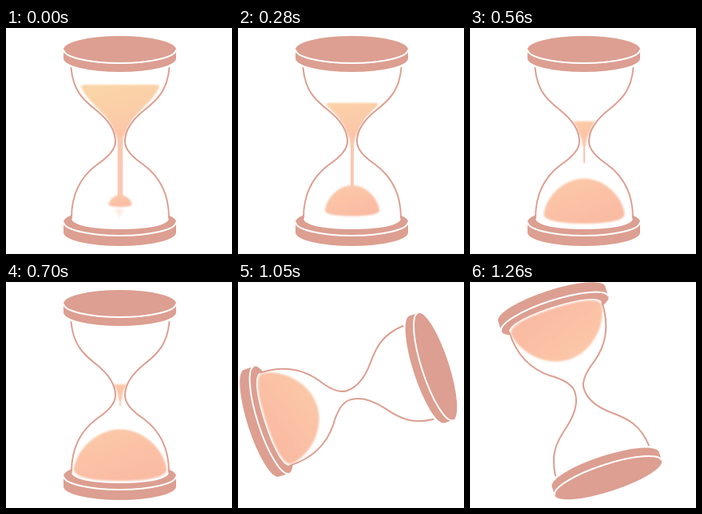
An HTML page that plays this animation: 283x283 px, repeating every 1330 ms.

```html
<!DOCTYPE html>
<html lang="en">
<head>
<meta charset="utf-8">
<title>Hourglass</title>
<style>
  html, body { margin: 0; width: 100%; height: 100%; overflow: hidden; background: #fff; }
  svg { display: block; width: 100vw; height: 100vh; }
  .wood { fill: #dc9f91; }
  .seam { fill: none; stroke: #fff; stroke-width: 2; }
  .glass { fill: none; stroke: #dc9f91; stroke-width: 2; stroke-linecap: round; }
</style>
</head>
<body>
<svg viewBox="0 0 283 283">
  <defs>
    <linearGradient id="gold" x1="0" y1="0" x2=".35" y2="1">
      <stop offset="0" stop-color="#fad7a8"/>
      <stop offset=".5" stop-color="#fbcfa8"/>
      <stop offset="1" stop-color="#fbc3a8"/>
    </linearGradient>
    <linearGradient id="peach" x1="0" y1="0" x2=".6" y2="1">
      <stop offset="0" stop-color="#fbcaa9"/>
      <stop offset="1" stop-color="#fabba3"/>
    </linearGradient>
    <filter id="soft" x="-20%" y="-20%" width="140%" height="140%">
      <feGaussianBlur stdDeviation=".9"/>
    </filter>
    <clipPath id="level"><rect id="cut"/></clipPath>
    <path id="side" d="M81.5 50C84 77 95 89 113 103C128 115 137 129 137 142C137 152 129 161 114 171C95 185 82 206 82 238"/>
  </defs>
  <g id="timer">
    <path class="wood" d="M72 243A70.5 17 0 0 1 213 243V256A70.5 17 0 0 1 72 256Z"/>
    <path class="seam" d="M72 243A70.5 17 0 0 0 213 243"/>
    <path fill="#fff" d="M82 238C82 206 95 185 114 171L143 160L172 171C191 185 204 206 204 238C204 247 178 252 143 252S82 247 82 238Z"/>
    <g id="upper" filter="url(#soft)">
      <g clip-path="url(#level)">
        <path fill="url(#gold)" d="M92 68C96 83 107 92 118 104C128 113 133 122 136 131C139 136 140.5 140 141 148H145C145.500 140 147 136 150 131C153 122 158 113 168 104C179 92 190 83 194 68Z"/>
      </g>
    </g>
    <path id="stream" stroke="#fac8b0" fill="none"/>
    <path id="dome" fill="url(#peach)" filter="url(#soft)"/>
    <path id="splash" fill="#fbd9c8" opacity=".5" filter="url(#soft)" d="M136 226L142 238L147 227Z"/>
    <use href="#side" class="glass"/>
    <use href="#side" class="glass" transform="matrix(-1 0 0 1 286 0)"/>
    <path class="wood" d="M72 27A70.5 17 0 0 1 213 27V38A70.5 17 0 0 1 72 38Z"/>
    <path class="seam" d="M72 27A70.5 17 0 0 0 213 27"/>
  </g>
</svg>
<script>
  const LOOP = 1330, STEP = 70, MID = 143;
  const el = id => document.getElementById(id);
  const set = (id, attrs) => {
    for (const k in attrs) el(id).setAttribute(k, attrs[k]);
  };

  const times = [0, 280, 420, 700, 840];
  const keys = {
    half: [14.5, 34, 43, 58, 59.5],
    top: [209, 197, 192.5, 184.5, 183],
    edge: [221, 228, 231, 234, 235],
    base: [224, 235.5, 241, 249, 250],
    surface: [50, 34, 25, 9, 1],
    tip: [212, 198, 183, 155, 140],
    width: [6.5, 4, 3, 1.6, 1]
  };

  function at(name, t) {
    const v = keys[name];
    if (t >= 840) return v[4];
    const i = times.findIndex(x => x > t) - 1;
    return v[i] + (v[i + 1] - v[i]) * (t - times[i]) / (times[i + 1] - times[i]);
  }

  function domePath(t) {
    const w = at('half', t), top = at('top', t), e = at('edge', t), b = at('base', t);
    const h = e - top, x = k => MID + k * w;
    return `M${x(-1)} ${e}C${x(-.94)} ${e - .5 * h} ${x(-.5)} ${top} ${MID} ${top}` +
      `S${x(.94)} ${e - .5 * h} ${x(1)} ${e}` +
      `C${x(1.02)} ${e + .7 * (b - e)} ${x(.6)} ${b} ${MID} ${b}` +
      `S${x(-1.02)} ${e + .7 * (b - e)} ${x(-1)} ${e}Z`;
  }

  function draw() {
    const t = Math.floor(performance.now() % LOOP / STEP) * STEP;
    const falling = t < 840 ? 'inline' : 'none';
    const level = 71 + t * .0815, half = at('surface', t);
    const angle = Math.max(0, (t - 882) * 3 / 7);

    set('timer', { transform: `rotate(${angle} 140.5 138.5)` });
    set('cut', { x: MID - half, y: level, width: 2 * half, height: 100, rx: Math.min(5, half / 4) });
    set('upper', { display: falling });
    set('stream', { display: falling, d: `M${MID} 138V${at('tip', t)}`, 'stroke-width': at('width', t) });
    set('dome', { d: domePath(t) });
    set('splash', { display: t < STEP ? 'inline' : 'none' });
    requestAnimationFrame(draw);
  }
  draw();
</script>
</body>
</html>
```
